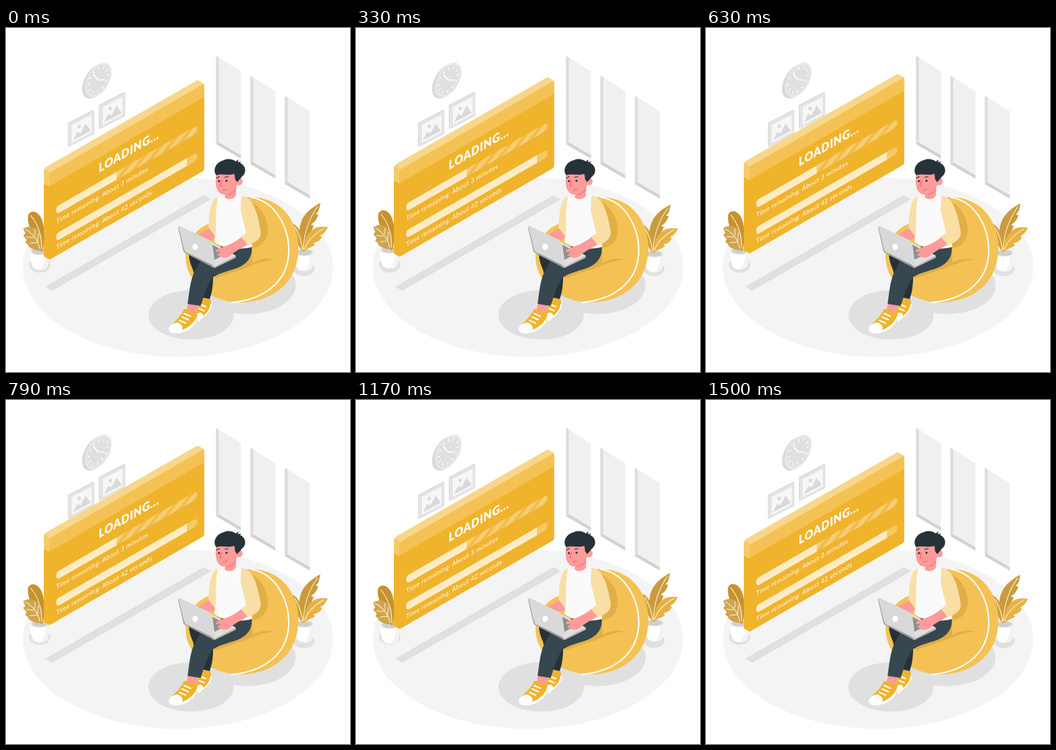
These frames come from a looping animation (500 by 500 pixels, 1.54 s). An HTML page:

```html
<!DOCTYPE html>
<html lang="en">
<head>
<meta charset="utf-8">
<title>Loading</title>
<style>
html, body { margin: 0; width: 100%; height: 100%; overflow: hidden; background: #fff; }
svg { display: block; width: 100vw; height: 100vh; }
text { font-family: Lato, "Open Sans", sans-serif; fill: #fff; }
.title { font-size: 17.8px; font-weight: 900; letter-spacing: .7px; }
.note { font-size: 9.6px; letter-spacing: .5px; }
.line { fill: none; stroke-linecap: round; stroke-linejoin: round; }
</style>
</head>
<body>
<svg viewBox="0 0 500 500">
  <defs>
    <g id="window">
      <path fill="#d2d2d2" d="M0 0 4 2V125L36 143V149L0 128Z"/>
      <path fill="#dcdcdc" d="M0 0 4 2V125L0 128Z"/>
      <path fill="#f0f0f0" d="M4 2 36 22V144L4 125Z"/>
    </g>
    <g id="picture">
      <path fill="#d6d6d6" d="M-1.5 -1 0 0V34L-1.5 33ZM-1.5 -1 35 -20 37 -19 0 0Z"/>
      <path fill="#e3e3e3" d="M0 0 37 -19V15L0 34Z"/>
      <path fill="#f7f7f7" d="M4 2 33 -13V13L4 28Z"/>
      <path fill="#d9d9d9" d="M6 24 12 12 17 14 24 0 31 9V11L6 24Z"/>
      <ellipse cx="15" cy="4" rx="2.3" ry="2.8" fill="#d9d9d9"/>
    </g>
    <g id="pot">
      <path fill="#fff" d="M-14 0C-14 12-12 20-9 24 -5 28 6 28 10 24 13 20 14 12 14 0Z"/>
      <path fill="#f3f3f3" d="M14 0C14 12 13 20 10 24 7 27 3 27 0 27 7 21 9 10 9 2Z"/>
      <ellipse rx="14" ry="5.5" fill="#ebebeb"/>
      <ellipse rx="11.5" ry="4.2" fill="#cfcfcf"/>
    </g>
    <clipPath id="bar"><rect width="237" height="11.5" rx="5.75"/></clipPath>
  </defs>

  <ellipse cx="250" cy="347.5" rx="225.5" ry="130.5" fill="#f4f4f4"/>
  <g fill="#e0e0e0">
    <path d="M57 376 287 243 298 249 67 382Z"/>
    <ellipse cx="269" cy="417" rx="62" ry="36"/>
    <ellipse cx="350" cy="374" rx="71" ry="42"/>
    <ellipse cx="49" cy="344" rx="15.5" ry="11.5"/>
    <ellipse cx="433" cy="350" rx="15.5" ry="10.5"/>
  </g>
  <use href="#window" x="305.5" y="41"/>
  <use href="#window" x="355.5" y="70"/>
  <use href="#window" x="405.5" y="99"/>

  <g transform="matrix(.866 -.5 0 1 130 77.5)"><circle r="22.5" fill="#d9d9d9"/></g>
  <g transform="matrix(.866 -.5 0 1 134 75.5)">
    <circle r="22.5" fill="#e8e8e8"/>
    <circle r="19.5" fill="#e0e0e0"/>
    <g class="line" stroke="#fff" stroke-width="1.5">
      <circle r="16" stroke-dasharray="1.5 6.878" stroke-width="4" stroke-linecap="butt"/>
      <path d="M-8 -12 0 0 10 5"/>
    </g>
  </g>
  <use href="#picture" x="91.5" y="139"/>
  <use href="#picture" x="136.5" y="113"/>

  <g id="plants">
    <use href="#pot" x="49" y="325"/>
    <path fill="#c6922c" d="M51 325C44 309 30 289 32 273 34 266 43 265 49 273 56 282 58 306 53 325Z"/>
    <path fill="#d0a44c" d="M49 324C39 323 32 319 32 315L28 312 30 308 25 302 28 299 25 292C32 287 43 288 49 296 55 303 54 317 49 324Z"/>
    <path class="line" stroke="#fff5dc" d="M36 273C47 286 52 302 52 322M28 293C40 300 47 310 49 321M42 302V293M46 310 47 299M46 312 35 313M40 305 30 304"/>
    <use href="#pot" x="433.5" y="326"/>
    <path fill="#c99b3c" d="M431 324C424 308 425 290 430 279 435 268 445 260 457 254 455 261 456 266 450 270L454 271C452 278 448 283 443 285L447 287C444 296 437 306 433 324Z"/>
    <path fill="#d2a139" d="M431 324C422 314 416 298 417 284 427 288 433 306 433 324Z"/>
    <path fill="#e6b244" d="M433 325C432 309 438 298 447 292 453 288 460 288 468 289 465 294 463 299 457 301L459 304C456 309 452 311 447 312L449 315C444 319 438 319 433 325Z"/>
    <path class="line" stroke="#fff5dc" d="M453 259C440 277 433 300 432 322M462 291C448 299 438 308 434 321M420 289C427 301 430 311 431 322"/>
  </g>

  <g id="board">
    <path fill="#f0b32c" d="M55 208 64 212V337L55 332Z"/>
    <path fill="#f8d68a" d="M55 212V208Q55 204 60 201L276 77Q279 75 281 77L288 81 288 86 66 214Z"/>
    <path fill="#f6cb6b" d="M55 226V209Q55 205 58 205L64 211V231Z"/>
    <g transform="matrix(.866 -.5 0 1 63 211)">
      <rect width="260" height="126" rx="3" fill="#f0b32c"/>
      <path fill="#f4c254" d="M0 19V5Q0 0 5 0H257Q260 0 260 3V19Z"/>
      <text class="title" x="83" y="41">LOADING...</text>
      <g transform="translate(11.5 54.5)" clip-path="url(#bar)">
        <path fill="#f2bd47" d="M0 0H237V12H0Z"/>
        <path id="stripes" stroke="#f6cd77" stroke-width="8"/>
        <path fill="#fcecc5" d="M0 0H101.5V12H0Z"/>
      </g>
      <text class="note" x="11.5" y="79.5">Time remaining: About 3 minutes</text>
      <g transform="translate(11.5 93.5)" clip-path="url(#bar)">
        <path fill="#f5c966" d="M0 0H237V12H0Z"/>
        <path fill="#fcecc5" d="M0 0H219.5V12H0Z"/>
      </g>
      <text class="note" x="11.5" y="117">Time remaining: About 42 seconds</text>
    </g>
  </g>

  <path fill="#f4c254" d="M348 246C398 242 425 279 425 320 425 368 390 399 338 399 298 397 263 372 261 335 261 312 275 292 296 284Z"/>
  <path fill="#e0af45" d="M350 250C373 257 385 286 379 303 375 316 367 318 358 320V342C365 337 378 333 391 337 365 338 352 350 335 353L304 364C300 360 310 320 330 310Z"/>
  <path class="line" stroke="#fff" stroke-width="2" d="M356 246C393 252 412 292 411 326 409 372 372 395 328 399"/>

  <path fill="#f0b32c" d="M283 391 297 394C301 407 294 416 284 424L275 426 277 411Z"/>
  <path class="line" stroke="#fff" stroke-width="2" d="M298 402C298 411 289 419 279 426M283 402 290 405M281 408 288 411"/>
  <path fill="#fff" d="M278 415C283 412 287 415 287 420L278 426Z"/>
  <path fill="#fc9b9a" d="M265 399 279 402 276 415 262 411Z"/>
  <path fill="#f0b32c" d="M259 408 276 414 278 411C280 424 272 434 260 440 250 444 238 443 237 436 241 429 253 422 259 408Z"/>
  <path fill="#fff" d="M237 435C240 430 246 428 250 428 256 431 258 435 256 439 270 433 275 426 278 418 279 432 262 444 246 444 239 444 235 440 237 435Z"/>
  <path class="line" stroke="#fff" stroke-width="2" d="M259 415 268 419M256 420 265 424M252 425 261 429"/>
  <path fill="#263238" d="M266 325 300 340 327 348 301 362C301 376 299 386 296 394L279 390 272 352C268 343 265 334 266 325Z"/>
  <path fill="#37474f" d="M303 318 357 316C359 334 350 346 326 352L302 360C291 375 288 389 283 404L264 401C267 380 268 362 277 349 282 336 292 330 303 318Z"/>

  <path fill="#fafafa" d="M308 246C319 249 331 246 342 242L351 252 358 318C343 323 315 321 303 311 306 292 302 266 308 246Z"/>
  <path fill="#f9dfa5" d="M308 245C295 249 296 275 294 293L304 305C307 290 303 270 308 245ZM342 244C359 245 365 267 370 294 372 305 365 311 351 316L341 304 349 298 341 265Z"/>
  <path fill="#fc9b9a" d="M295 291 304 303 300 308 275 305C279 298 288 297 295 291Z"/>

  <path fill="#b5b5b5" d="M297 310 334 331V334L303 349 299 347Z"/>
  <path fill="#e0e0e0" d="M297 310 334 331 303 347Z"/>
  <path fill="#8f8f8f" d="M300 315 322 327 303 337Z"/>
  <path fill="#a6a6a6" d="M252 288 254 288 262 326 301 346 303 349 260 327 258 325 250 290Z"/>
  <path fill="#d9d9d9" d="M253 288 295 308Q298 310 299 313L304 347 262 326Q260 325 259 322L251 290Q251 287 253 288Z"/>
  <ellipse cx="275" cy="318" rx="4" ry="4.5" fill="#fff"/>
  <path fill="#fc9b9a" d="M342 304 351 315C342 320 333 324 326 331 320 336 313 334 307 330L312 325 306 326 305 323C315 317 326 317 342 304Z"/>

  <path fill="#fc9b9a" d="M319 235 335 225 334 244C329 250 321 250 318 246Z"/>
  <path fill="#ef8586" d="M320 242C328 240 332 235 334 230V236C330 242 325 244 320 242Z"/>
  <path fill="#fc9b9a" d="M306 208C303 226 305 241 317 242 328 241 334 235 336 228 343 231 347 222 341 218L335 220 333 207Z"/>
  <path fill="#263238" d="M306 214C300 208 304 195 317 192 323 189 330 191 334 194L338 191 337 195 342 194 340 196C350 201 349 211 344 215 341 218 340 220 336 224L333 220 332 212C323 215 313 211 306 214Z"/>
  <g class="line" stroke="#263238" stroke-width="1.1">
    <path d="M306 218 310 216M318 217 323 216"/>
    <path stroke="#db6d69" d="M313 222 311 229 314 230M316 236 321 234"/>
  </g>
  <circle cx="309.5" cy="222.5" r="1.5" fill="#263238"/>
  <circle cx="320.5" cy="222" r="1.5" fill="#263238"/>
</svg>
<script>
const LOOP = 1540, LEAD = 30;
const $ = id => document.getElementById(id);

let d = '';
for (let x = 84; x < 245; x += 26) d += `M${x} 16l32 -20`;
$('stripes').setAttribute('d', d);

function draw() {
  const phase = (performance.now() + LEAD) / LOOP * 2 * Math.PI;
  const lift = -9.5 * (1 - Math.cos(phase)) / 2;
  const tilt = 0.68 * Math.sin(phase);
  $('board').setAttribute('transform', `translate(0 ${lift})`);
  $('plants').setAttribute('transform', `rotate(${tilt} 247 302)`);
  requestAnimationFrame(draw);
}
draw();
</script>
</body>
</html>
```
